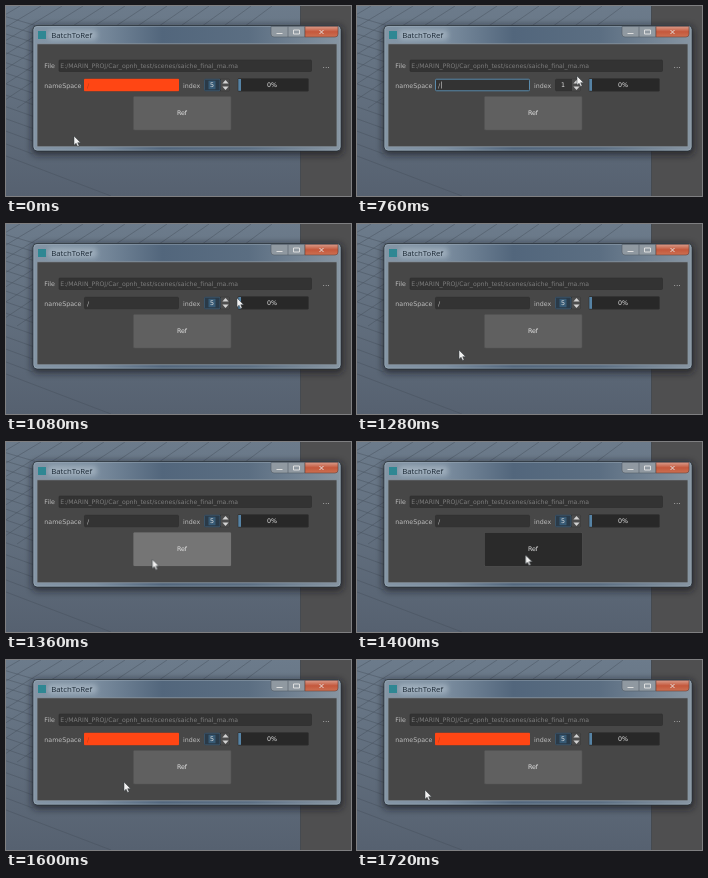
Animation of 345 by 190 pixels, one loop 2120 ms. Source, as an HTML page:

```html
<!DOCTYPE html>
<html lang="en">
<head>
<meta charset="utf-8">
<title>BatchToRef</title>
<style>
html, body { margin: 0; width: 100%; height: 100%; overflow: hidden; background: #626d79; }
svg { display: block; }
.stage { width: 100vw; height: 100vh; }
text { font: 6.3px "DejaVu Sans", Verdana, sans-serif; fill: #bcbcbc; white-space: pre; }
.title { font: 7.8px "Open Sans", "Noto Sans", sans-serif; fill: #1d2a36; }
.path { font-size: 6.15px; fill: #7c7c7c; }
.mid { text-anchor: middle; fill: #e2e2e2; }
.field { fill: #333; stroke: #2c2c2c; stroke-width: .6; }
.grid { fill: none; stroke: #434e5a; stroke-width: .7; opacity: .6; }
.soft { filter: url(#soft); }

/* 2120 ms loop; hard cuts unless a segment sets its own steps */
.red, .focus, .select, .hover, .press, .digits, .cursor { animation: 2120ms step-end infinite; }
.red { animation-name: red; }
.focus { animation-name: focus; }
.select { animation-name: select; }
.hover { animation-name: hover; }
.press { animation-name: press; }
.digits { animation-name: count; }
.cursor { animation-name: move; }

@keyframes red { 0%, 67.92% { opacity: 1 } 35.84% { opacity: 0 } }
@keyframes focus { 0%, 39.62% { opacity: 0 } 35.84% { opacity: 1 } }
@keyframes select { 0%, 39.62% { opacity: 1 } 35.84% { opacity: 0 } }
@keyframes hover { 0%, 75.47% { opacity: 0 } 62.26% { opacity: 1 } }
@keyframes press { 0%, 67.92% { opacity: 0 } 66.03% { opacity: 1 } }
@keyframes count {
  0% { transform: translateY(-48px) }
  35.84% { transform: translateY(0) }
  37.73% { transform: translateY(0); animation-timing-function: steps(4) }
  45.28%, 100% { transform: translateY(-48px) }
}
@keyframes move {
  0% { transform: translate(68px, 130px) }
  35.84% { transform: translate(220px, 70px) }
  37.73% { transform: translate(220px, 74px) }
  47.16% { transform: translate(220px, 74px); animation-timing-function: steps(2) }
  50.94% { transform: translate(231px, 74px); animation-timing-function: steps(2) }
  54.71% { transform: translate(186px, 92px); animation-timing-function: steps(2) }
  58.49% { transform: translate(115px, 121px) }
  60.37% { transform: translate(102px, 126px); animation-timing-function: steps(3) }
  66.03% { transform: translate(168.5px, 113px) }
  69.81% { transform: translate(168.5px, 113px); animation-timing-function: steps(2) }
  73.58% { transform: translate(142px, 118px); animation-timing-function: steps(2) }
  77.35% { transform: translate(94px, 126px); animation-timing-function: steps(2) }
  81.13%, 100% { transform: translate(68px, 130px) }
}
</style>
</head>
<body>
<svg class="stage" viewBox="0 0 345 190" preserveAspectRatio="none">
  <defs>
    <linearGradient id="sky" x2="0" y2="1">
      <stop stop-color="#6c7b8b"/><stop offset="1" stop-color="#566170"/>
    </linearGradient>
    <linearGradient id="glass">
      <stop stop-color="#8495a5"/><stop offset=".2" stop-color="#7b8d9f"/><stop offset=".42" stop-color="#52667c"/>
      <stop offset=".7" stop-color="#5b6e82"/><stop offset="1" stop-color="#8795a2"/>
    </linearGradient>
    <linearGradient id="close" x2="0" y2="1">
      <stop stop-color="#d99a88"/><stop offset=".5" stop-color="#c4583c"/><stop offset="1" stop-color="#cc7052"/>
    </linearGradient>
    <filter id="soft" color-interpolation-filters="sRGB"><feGaussianBlur stdDeviation=".5"/></filter>
    <filter id="shadow" x="-10%" y="-15%" width="120%" height="135%"><feGaussianBlur stdDeviation="3.5"/></filter>
    <filter id="glow" x="-20%" y="-80%" width="140%" height="260%"><feGaussianBlur stdDeviation="2.5"/></filter>
    <clipPath id="floor"><path d="M0 0H270L240 40L27 148H0Z"/></clipPath>
  </defs>

  <rect width="345" height="190" fill="url(#sky)"/>
  <g class="soft">
    <g class="grid" id="grid" clip-path="url(#floor)"></g>
    <path class="grid" d="M0 150L105 190" opacity=".4"/>
  </g>
  <rect x="294.5" width="51" height="190" fill="#4f4f50"/>
  <path d="M294.5 0V190" stroke="#454a50"/>

  <rect x="26" y="20" width="311" height="129" rx="5" fill="#12171c" opacity=".65" filter="url(#shadow)"/>
  <g class="soft">
    <rect x="27" y="19.5" width="308" height="125.5" rx="4" fill="url(#glass)" stroke="#262e36" stroke-width=".8"/>
    <rect x="27.9" y="20.4" width="306.2" height="123.7" rx="3.4" fill="none" stroke="#a9b6c1" stroke-width=".6" opacity=".7"/>
    <rect x="42" y="24" width="49" height="10" rx="4" fill="#b4c2ce" opacity=".6" filter="url(#glow)"/>
    <rect x="32" y="25" width="8" height="8" fill="#2f8793"/>
    <text class="title" x="45.2" y="32">BatchToRef</text>

    <path d="M265 20.5h34v10.5h-31q-3 0-3-3z" fill="#9099a1" stroke="#525c65" stroke-width=".6"/>
    <path d="M282 20.5v10.5" stroke="#525c65" stroke-width=".6"/>
    <path d="M299 20.5h33v7.5q0 3-3 3h-30z" fill="url(#close)" stroke="#6b4038" stroke-width=".6"/>
    <path d="M270.5 27.5h6M287.5 24h6v4h-6zM313.5 24l4 4M317.5 24l-4 4" fill="none" stroke="#e6e6e6" stroke-width=".9"/>

    <rect x="31" y="37.8" width="300" height="103" fill="#474747" stroke="#8b98a4" stroke-width=".8"/>

    <text x="38.3" y="62.3">File</text>
    <rect class="field" x="53" y="54" width="252.5" height="11.5" rx="1"/>
    <text class="path" x="54.3" y="62">E:/MARIN_PROJ/Car_opnh_test/scenes/saiche_final_ma.ma</text>
    <text x="316.5" y="62" style="font-size:7.5px">...</text>

    <text x="38.3" y="81.5">nameSpace</text>
    <rect class="field" x="78.5" y="73.2" width="94" height="11.6" rx="1"/>
    <text x="81" y="81.5">/</text>
    <g class="focus">
      <rect x="78.5" y="73.2" width="94" height="11.6" rx="1" fill="none" stroke="#5b8cad"/>
      <path d="M84.5 75.5v7" stroke="#d0d0d0" stroke-width=".6"/>
    </g>
    <g class="red">
      <rect x="78" y="72.7" width="95" height="12.6" rx="1" fill="#ff4614"/>
      <text x="81" y="81.5" style="fill:#b93a18">/</text>
    </g>

    <text x="177" y="81.5">index</text>
    <rect class="field" x="198.5" y="73.2" width="25" height="11.6" rx="1"/>
    <g class="select">
      <rect x="198.5" y="73.2" width="15.5" height="11.6" rx="1" fill="#2a3a48" stroke="#41647e" stroke-width=".7"/>
      <rect x="202.5" y="74.8" width="7" height="8.4" fill="#375a75"/>
    </g>
    <svg x="199" y="73" width="15" height="12">
      <g class="digits" id="digits"></g>
    </svg>
    <rect x="215" y="73.2" width="8.5" height="11.6" fill="#4c4c4c"/>
    <path d="M216.4 77.4l3.1-3.4 3.1 3.4zM216.4 80.6l3.1 3.4 3.1-3.4z" fill="#d2d2d2"/>

    <rect x="232" y="72.5" width="70.5" height="12.8" rx="1" fill="#282828" stroke="#333" stroke-width=".6"/>
    <rect x="232.3" y="73" width="2.7" height="11.8" fill="#5683a5"/>
    <text class="mid" x="266" y="81.4">0%</text>

    <rect x="127.5" y="90.5" width="97.5" height="33.5" rx="1" fill="#606060" stroke="#555" stroke-width=".6"/>
    <rect class="hover" x="127.5" y="90.5" width="97.5" height="33.5" rx="1" fill="#757575"/>
    <rect class="press" x="127.5" y="90.5" width="97.5" height="33.5" rx="1" fill="#2a2a2a"/>
    <text class="mid" x="176" y="109.3">Ref</text>
  </g>

  <g class="cursor">
    <path class="soft" d="M0 0V9.2L2.1 7.2 3.6 10.5 5.1 9.8 3.7 6.7H6.6Z" fill="#f2f2f2" stroke="#33383c" stroke-width=".5"/>
  </g>
</svg>
<script>
const NS = "http://www.w3.org/2000/svg";
function add(parent, tag, attrs, text = "") {
  const el = document.createElementNS(NS, tag);
  for (const key in attrs) el.setAttribute(key, attrs[key]);
  el.textContent = text;
  document.getElementById(parent).append(el);
}

for (let n = 1; n <= 5; n++)
  add("digits", "text", { x: 7, y: 8.4 + (n - 1) * 12, class: "mid" }, n);

// Floor grid: two fans of lines
let d = "";
for (let i = 0; i < 13; i++) {
  const y = 138 - i * 13 + i * i * 0.2;
  d += `M0 ${y}L300 ${y + 112 - i * 2}`;
}
for (let i = 0; i < 15; i++) {
  const x = 14 + i * 21;
  d += `M${x} 0L${x - 150} ${88 + i * 2}`;
}
add("grid", "path", { d });
</script>
</body>
</html>
```
